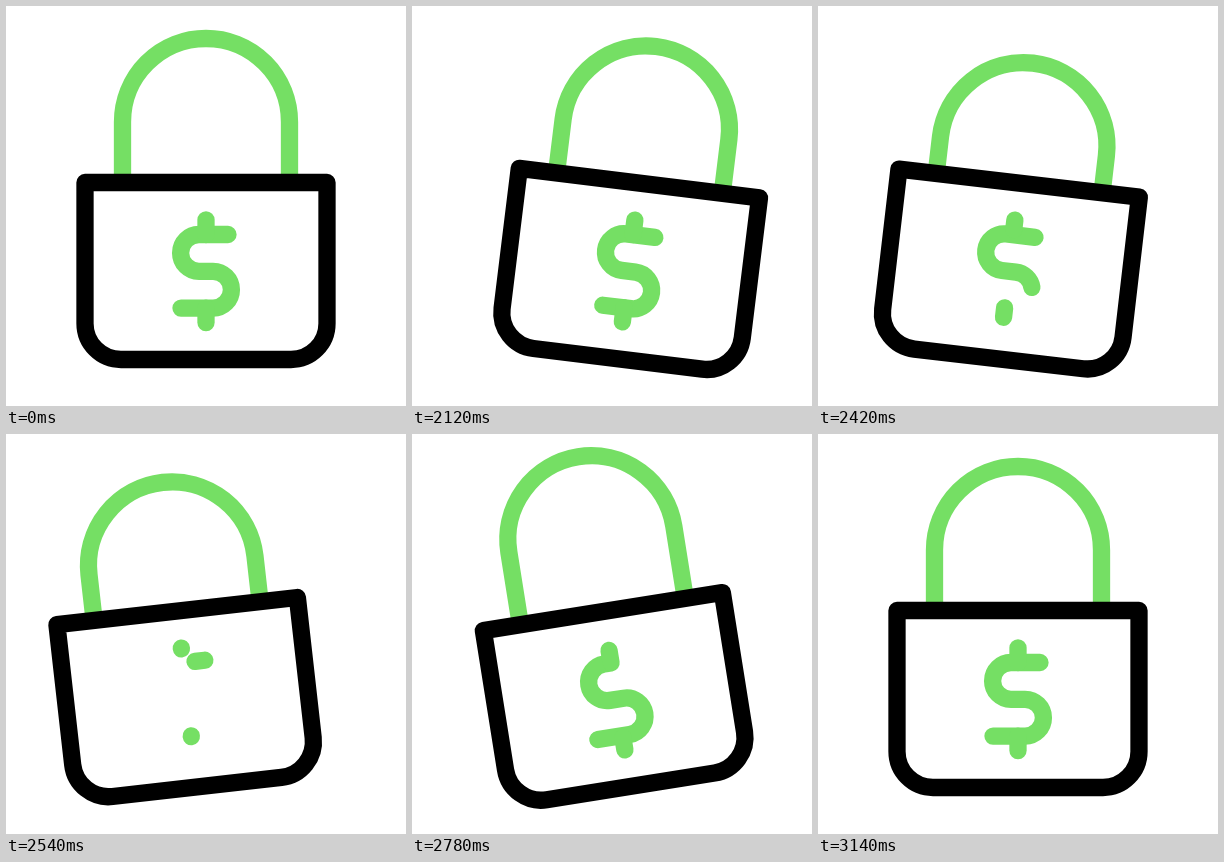
Animation of 400 by 400 pixels, one loop 3170 ms. Source, as an HTML page:

```html
<!DOCTYPE html>
<html lang="en">
<head>
<meta charset="utf-8">
<title>Shaking padlock</title>
<style>
  html, body { margin: 0; height: 100%; overflow: hidden; background: #fff; }
  svg { display: block; width: 100vw; height: 100vh; }
  path { fill: none; stroke: #75df64; stroke-width: 17.3; stroke-linejoin: round; }
  .body { stroke: #000; }
  .sign { stroke-linecap: round; }
</style>
</head>
<body>
<svg viewBox="0 0 400 400">
  <g id="lock">
    <path id="shackle"/>
    <path class="body" d="M79 176.5H321V317.5A36 36 0 0 1 285 353.5H115A36 36 0 0 1 79 317.5Z"/>
    <path class="sign" pathLength="1" d="M222 228.5H193A18.4 18.4 0 0 0 193 265.3H207A18.4 18.4 0 0 1 207 302.1H175"/>
    <path class="sign" pathLength="1" d="M200 213.8V228.5"/>
    <path class="sign" pathLength="1" d="M200 302.1V316.6"/>
  </g>
</svg>
<script>
  const LOOP = 3170, START = 2030, STEP = 30, SWAP = 2545;
  const lock = document.getElementById('lock');
  const shackle = document.getElementById('shackle');
  const signs = document.querySelectorAll('.sign');

  // Keys are [time, value, easing power]; a power of 2 is a sine ease in and out.
  const shift = [[2000, 0], [2235, 25, 1.25], [2510, -20], [2733, 5], [3140, 0]];
  const tilt = [[2000, 0], [2272, 15, 1.7], [2690, -15], [2935, 5], [3140, 0]];
  const drop = [[2000, 0], [2350, 24], [2800, -13, 2.8], [2930, 5], [3140, 0]];

  function valueAt(keys, t) {
    const i = keys.findIndex(key => key[0] > t);
    if (i < 1) return 0;
    const [t0, v0] = keys[i - 1];
    const [t1, v1, power = 2] = keys[i];
    return v0 + (v1 - v0) * Math.sin((t - t0) / (t1 - t0) * Math.PI / 2) ** power;
  }

  function draw(now) {
    const time = now % LOOP;
    const t = time < START ? 0 : START + Math.floor((time - START) / STEP) * STEP;

    lock.setAttribute('transform',
      `translate(${valueAt(shift, t)} 0) rotate(${valueAt(tilt, t)} 200 265.4)`);

    const y = 116 + valueAt(drop, t);
    shackle.setAttribute('d', `M116.5 176.5V${y}A83.5 83.5 0 0 1 283.5 ${y}V176.5`);

    // The sign is wiped from its end, then drawn back from its end.
    const hidden = Math.max(0, Math.exp(-Math.abs(t - SWAP) / 122) - 0.012);
    for (const sign of signs) {
      sign.style.strokeDasharray = hidden ? `${1 - hidden} 2` : 'none';
      sign.style.strokeDashoffset = t < SWAP ? 0 : -hidden;
    }
    requestAnimationFrame(() => draw(performance.now() - origin));
  }

  const origin = performance.now();
  draw(0);
</script>
</body>
</html>
```
